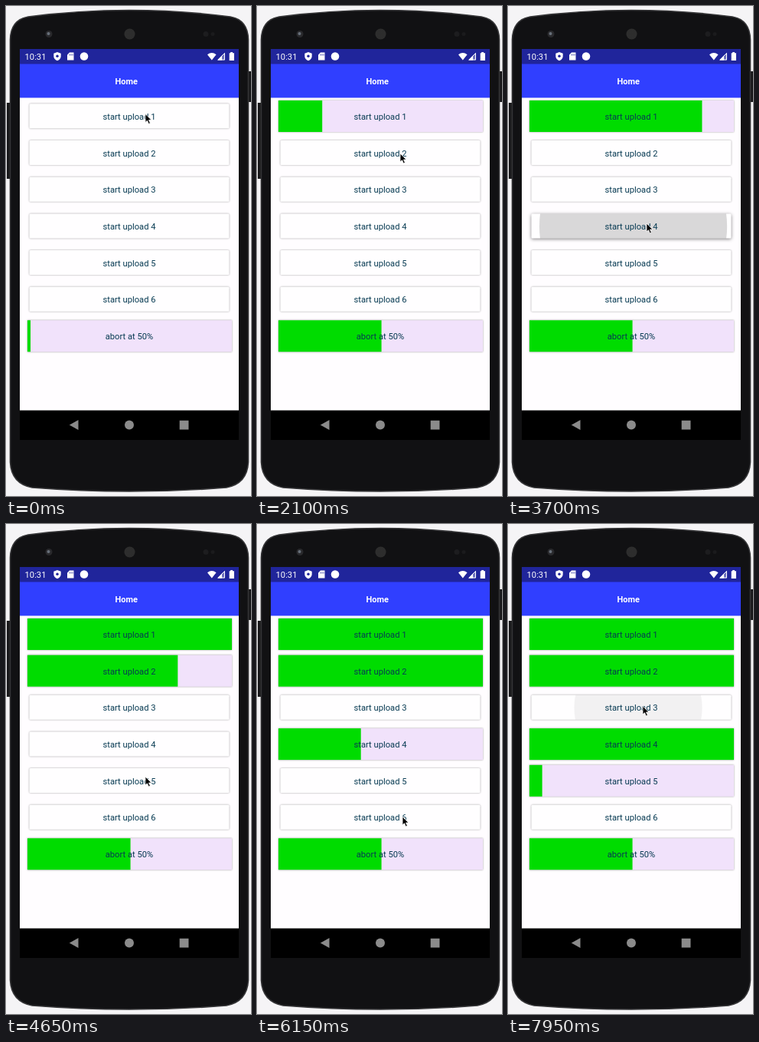
Write an HTML page that moves like this. It is 320 px wide and 638 px high and loops after 8 s.

```html
<!DOCTYPE html>
<html lang="en">
<head>
<meta charset="utf-8">
<title>Upload buttons</title>
<style>
  html, body { margin: 0; width: 100%; height: 100%; overflow: hidden; background: #f5f4f6; }
  svg { display: block; width: 320px; height: 638px; }
  text { font: 11.2px Roboto, sans-serif; fill: #073a52; text-anchor: middle; }
  .card { filter: drop-shadow(0 .7px .8px rgba(0, 0, 0, .38)); }
  .pressed { filter: drop-shadow(0 1.5px 2px rgba(0, 0, 0, .5)); }
</style>
</head>
<body>
<svg viewBox="0 0 320 638">
  <defs>
    <clipPath id="buttonShape"><rect x="30.5" y="-16.5" width="261" height="32" rx="1.5"/></clipPath>
    <pattern id="mesh" width="2" height="2" patternUnits="userSpaceOnUse">
      <rect width="2" height="2" fill="#181818"/><circle cx="1" cy="1" r=".65" fill="#555"/>
    </pattern>
  </defs>

  <!-- phone -->
  <path d="M1 126h6v99H1zM314 85h6v40h-6z" fill="#19191b"/>
  <path d="M5.5 44Q6 18 29 14Q95 5.5 161 5.5T293 14Q316 18 316.5 44V594Q315 622 288 627Q225 632 161 632T34 627Q7 622 5.5 594Z"
        fill="#111113" stroke="#353537" stroke-width="1.6"/>
  <circle cx="56" cy="36.500" r="4.500" fill="#29292c"/>
  <circle cx="55.500" cy="36" r="2" fill="#68707a"/>
  <circle cx="161.500" cy="36.500" r="7" fill="url(#mesh)"/>
  <circle cx="261" cy="36.500" r="3.500" fill="#1d1d1f"/>
  <circle cx="270" cy="36.500" r="2.500" fill="#1b1b1d"/>

  <!-- screen -->
  <rect x="18" y="56" width="286" height="509" fill="#fffdff"/>
  <rect x="18" y="56" width="286" height="20" fill="#20259b"/>
  <rect x="18" y="75.500" width="286" height="44" fill="#303fff"/>
  <text x="157.300" y="101.800" style="font-size:11px;font-weight:700;fill:#fff">Home</text>
  <text x="38.500" y="70" style="font-size:11.200px;fill:#fff">10:31</text>
  <g fill="#fff">
    <path d="M67 60l4.700 1.800v3.400q0 4-4.700 6q-4.700-2-4.700-6v-3.400z"/>
    <path d="M83 60.500h5.500v10h-8.500v-7z"/>
    <circle cx="102" cy="65.500" r="5.300"/>
    <path d="M263 63.300q5.800-4.600 11.600 0l-5.800 7.200z"/>
    <path d="M286 60.500v10h-10z" fill-opacity=".35"/>
    <path d="M285.500 61.500v8.500h-8.500z" fill="none" stroke="#fff"/>
    <path d="M276 70.500h6v-6z"/>
    <path d="M293.200 60h2.800v1.200h2v9.800h-6.300v-9.800h1.500z"/>
  </g>
  <circle cx="67" cy="65.300" r="1.700" fill="#20259b"/>
  <path d="M83 62.500v2M85 62.500v2M87 62.500v2" stroke="#20259b" stroke-width=".8"/>
  <rect x="18" y="526.500" width="286" height="38.500"/>
  <g fill="#8b8b8b">
    <path d="M82.800 545.500l11.700-6.500v13z"/>
    <circle cx="161" cy="545.500" r="6"/>
    <rect x="226.700" y="539.700" width="11.800" height="11.800"/>
  </g>

  <g id="rows"></g>
  <path id="cursor" d="M0 0V11l2.500-2.300 1.900 4.300 2-.9-1.900-4.100H8z" stroke="#fff" stroke-width=".8"/>
</svg>

<script>
const DURATION = 8000;
const BAR_LEFT = 28, BAR_WIDTH = 267, CENTER = 161;

// Progress points are [time, percent]; press is the moment the button is touched.
const rows = [
  { label: "start upload 1", press: 150, progress: [[1557, 0], [4096, 100]] },
  { label: "start upload 2", press: 1150, progress: [[4150, 0], [4650, 73.4], [4840, 100]] },
  { label: "start upload 3", press: 7895 },
  { label: "start upload 4", press: 3540, progress: [[5110, 0], [6150, 40.3], [7700, 100]] },
  { label: "start upload 5", press: 4740, progress: [[7795, 0], [7950, 6.2], [8000, 8.2]] },
  { label: "start upload 6", press: 6250 },
  { label: "abort at 50%", progress: [[-42, 0], [1000, 36.5], [1390, 50.4]] }
];

// Pointer stops: [time, x, y]
const pointer = [
  [0, 182, 140.5], [450, 182, 140.5], [900, 186, 190], [1300, 187, 192], [2350, 187, 192],
  [3300, 181, 283], [3950, 181, 283], [4500, 182, 329], [5050, 182, 329],
  [5750, 190, 381], [6800, 190, 381], [7650, 176, 237], [8000, 176, 237]
];

const clamp = v => Math.max(0, Math.min(1, v));
const smooth = v => v * v * (3 - 2 * v);
const linear = v => v;

function track(points, time, column, ease) {
  const next = points.findIndex(p => p[0] > time);
  if (next < 0) return points.at(-1)[column];
  if (next === 0) return points[0][column];
  const a = points[next - 1], b = points[next];
  return a[column] + (b[column] - a[column]) * ease((time - a[0]) / (b[0] - a[0]));
}

function add(parent, tag, attrs) {
  const node = document.createElementNS("http://www.w3.org/2000/svg", tag);
  for (const key in attrs) node.setAttribute(key, attrs[key]);
  return parent.appendChild(node);
}

rows.forEach((row, i) => {
  const group = add(document.getElementById("rows"), "g", { transform: `translate(0 ${143.8 + i * 47.7})` });
  row.button = add(group, "g", { class: "card" });
  add(row.button, "rect", { x: 30.5, y: -16.5, width: 261, height: 32, rx: 1.5, fill: "#fffeff" });
  const clipped = add(group, "g", { "clip-path": "url(#buttonShape)" });
  row.ripple = add(clipped, "circle", { fill: "#000" });
  row.bar = add(group, "g", { class: "card" });
  add(row.bar, "rect", { x: BAR_LEFT, y: -20.8, width: BAR_WIDTH, height: 41, fill: "#f1e2fb" });
  row.fill = add(row.bar, "rect", { x: BAR_LEFT, y: -20.8, height: 41, fill: "#00dc00" });
  add(group, "text", { x: CENTER, y: 4 }).textContent = row.label;
});

function drawRipple(row, time, touchX) {
  const age = time - row.press;
  const active = age >= 0 && age < 700;
  const grow = 1 - (1 - clamp(age / 250)) ** 2;
  row.button.setAttribute("class", active && age > 80 && age < 350 ? "pressed" : "card");
  row.ripple.setAttribute("cx", touchX + (CENTER - touchX) * grow);
  row.ripple.setAttribute("r", 51 + 82 * grow);
  row.ripple.setAttribute("opacity", active ? 0.15 * clamp(age / 160) * clamp((700 - age) / 400) : 0);
}

function draw(time) {
  const x = track(pointer, time, 1, smooth), y = track(pointer, time, 2, smooth);
  document.getElementById("cursor").setAttribute("transform", `translate(${x} ${y})`);
  for (const row of rows) {
    const running = row.progress && time >= row.progress[0][0];
    row.bar.style.display = running ? "" : "none";
    row.button.style.display = running ? "none" : "";
    if (running) row.fill.setAttribute("width", BAR_WIDTH * track(row.progress, time, 1, linear) / 100);
    drawRipple(row, time, x);
  }
}

function frame() {
  draw(performance.now() % DURATION);
  requestAnimationFrame(frame);
}
frame();
</script>
</body>
</html>
```
